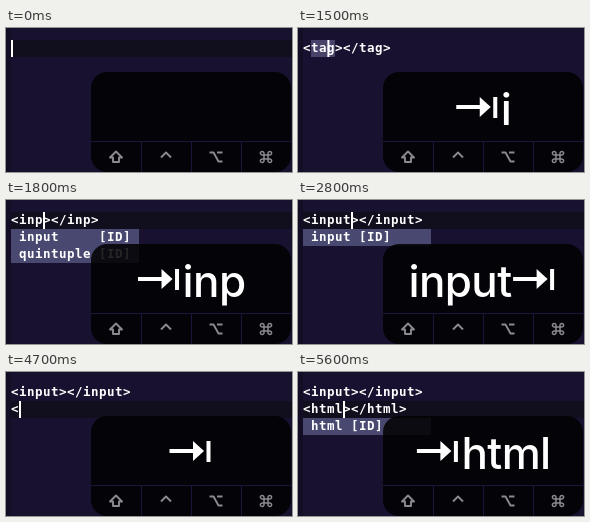
An HTML page with a canvas that plays this animation: 286 by 144 pixels, repeating every 6.4 s.

```html
<!DOCTYPE html>
<html lang="en">
<head>
<meta charset="utf-8">
<title>Typing tags</title>
<style>
  html, body { margin: 0; width: 100%; height: 100%; overflow: hidden; background: #18112f; }
  canvas { display: block; width: 286px; height: 144px; }
</style>
</head>
<body>
<canvas id="stage"></canvas>
<script>
const W = 286, H = 144, LOOP = 6400;
const COL = 8, ROW = 17, LEFT = 5, TOP = 12;
const CODE_FONT = 'bold 12.5px "DejaVu Sans Mono", monospace';
const KEY_FONT = '500 44px Inter, sans-serif';
const TAB = '\u21e5', RETURN = '\u21a9';
const ARROW_Y = 79;
const COLORS = {
  page: '#18112f', gutter: '#130e25', line: '#110e1e', select: '#49436a',
  menu: '#484870', panel: 'rgba(0,0,0,.85)', rule: '#18163a', icon: '#8b8a91'
};

const WORDS = ['input', 'quintuple', 'html', 'width', 'height', 'title'];
const fuzzy = query => WORDS.filter(word => {
  let at = -1;
  return [...query].every(ch => (at = word.indexOf(ch, at + 1)) >= 0);
});
const pair = name => `<${name}></${name}>`;
const typed = (name, row) => ({
  [row ? 'second' : 'first']: pair(name), col: 1 + name.length,
  keys: TAB + name, selected: false
});

// Each step changes only the listed parts of the state.
const STEPS = [
  [0, { first: '', second: '', row: 0, col: 0, caret: true, shift: false,
        selected: false, keys: '', menu: '' }],
  [100, { shift: true }],
  [400, { first: '<', col: 1, keys: '<' }],
  [600, { shift: false, keys: '' }],
  [800, { keys: TAB }],
  [900, { first: pair('tag'), selected: true }],
  [1000, { col: 2.9 }],
  [1200, { col: 4 }],
  [1400, { keys: TAB + 'i' }],
  [1500, { col: 3.05 }],
  [1600, typed('i', 0)],
  [1700, { ...typed('in', 0), menu: 'i' }],
  [1800, { ...typed('inp', 0), menu: 'inp' }],
  [1900, typed('inpu', 0)],
  [2000, { menu: 'inpu' }],
  [2100, typed('input', 0)],
  [2800, { keys: 'input' + TAB }],
  [2900, { col: 15, menu: '' }],
  [3400, { row: 1, col: 0, keys: 'nput' + TAB + RETURN }],
  [4100, { caret: false }],
  [4300, { caret: true, shift: true, keys: '' }],
  [4400, { second: '<', col: 1, keys: '<' }],
  [4600, { shift: false, keys: '' }],
  [4700, { keys: TAB }],
  [4900, { second: pair('tag'), selected: true, col: 2.9 }],
  [5000, { col: 4 }],
  [5100, { keys: TAB + 'h', col: 3.05 }],
  [5200, typed('h', 1)],
  [5300, { ...typed('ht', 1), menu: 'h' }],
  [5400, typed('htm', 1)],
  [5500, typed('html', 1)],
  [5600, { menu: 'html' }]
];

const stateAt = time =>
  Object.assign({}, ...STEPS.filter(([start]) => start <= time).map(step => step[1]));

const canvas = document.getElementById('stage');
const ctx = canvas.getContext('2d');
const ratio = window.devicePixelRatio || 1;
canvas.width = W * ratio;
canvas.height = H * ratio;

function box(color, x, y, w, h) {
  ctx.fillStyle = color;
  ctx.fillRect(x, y, w, h);
}

function setFont(font, spacing) {
  ctx.font = font;
  ctx.letterSpacing = spacing;
}

function code(text, col, row) {
  setFont(CODE_FONT, '0.475px');
  ctx.fillStyle = '#fff';
  ctx.fillText(text, LEFT + col * COL, TOP + row * ROW + 12);
}

function stroke(path, x, y, color, width) {
  ctx.save();
  ctx.translate(x, y);
  ctx.strokeStyle = color;
  ctx.lineWidth = width;
  ctx.lineJoin = 'round';
  ctx.stroke(new Path2D(path));
  ctx.restore();
}

function drawEditor(s) {
  box(COLORS.page, 0, 0, W, H);
  box(COLORS.gutter, 0, 0, LEFT, H);
  const y = TOP + s.row * ROW;
  if (s.selected) box(COLORS.select, LEFT + COL, y, 3 * COL, ROW);
  else box(COLORS.line, LEFT, y, W - LEFT, ROW);
  code(s.first, 0, 0);
  code(s.second, 0, 1);
  if (s.caret) box('#fff', LEFT + s.col * COL, y, 2, ROW);
}

function drawMenu(s) {
  const words = s.menu ? fuzzy(s.menu) : [];
  const length = Math.max(...words.map(word => word.length));
  words.forEach((word, i) => {
    const row = s.row + 1 + i;
    box(COLORS.menu, LEFT, TOP + row * ROW, 16 * COL, ROW);
    code(word.padEnd(length) + ' [ID]', 1, row);
  });
}

const ICONS = [
  [110, 'M0-5.5L6 .5H3V5H-3V.5H-6Z'],
  [160, 'M-5 .5L0-4.5L5 .5'],
  [210, 'M-6.5-4.5H-2.5L2.5 4.5H6.5M1-4.5H6.5'],
  [260, 'M-2-2H2V2H-2ZM-2-2H-3.7A1.8 1.8 0 1 1-2-3.8ZM2-2V-3.8A1.8 1.8 0 1 1 3.7-2Z' +
        'M2 2H3.7A1.8 1.8 0 1 1 2 3.8ZM-2 2V3.8A1.8 1.8 0 1 1-3.7 2Z']
];

function drawPanel(s) {
  ctx.fillStyle = COLORS.panel;
  ctx.beginPath();
  ctx.roundRect(85, 44, 200, 100, 16);
  ctx.fill();
  box(COLORS.rule, 85, 113, 200, 1);
  for (const x of [135, 185, 235]) box(COLORS.rule, x, 114, 1, 30);
  ICONS.forEach(([x, path], i) =>
    stroke(path, x, 129, i === 0 && s.shift ? '#fff' : COLORS.icon, i === 3 ? 1.5 : 1.9));
}

function arrowHead(tip, base) {
  ctx.beginPath();
  ctx.moveTo(tip, ARROW_Y);
  ctx.lineTo(base, ARROW_Y - 10);
  ctx.lineTo(base, ARROW_Y + 10);
  ctx.fill();
}

function drawTab(x) {
  box('#fff', x + 1.5, ARROW_Y - 2, 26, 4);
  arrowHead(x + 36, x + 25);
  box('#fff', x + 38.5, ARROW_Y - 10, 4, 21);
}

function drawReturn(x) {
  ctx.fillStyle = '#fff';
  arrowHead(x + 4, x + 15);
  stroke(`M13 ${ARROW_Y}H33.5a8.75 8.75 0 0 0 0-17.5H29`, x, 0, '#fff', 4);
}

function drawKeys(keys) {
  const parts = keys.match(/[\u21e5\u21a9]|[^\u21e5\u21a9]+/g) || [];
  setFont(KEY_FONT, '-0.6px');
  const widths = parts.map(part =>
    part === TAB ? 46 : part === RETURN ? 50 : ctx.measureText(part).width);
  let x = 185 - widths.reduce((sum, w) => sum + w, 0) / 2;
  parts.forEach((part, i) => {
    ctx.fillStyle = '#fff';
    if (part === TAB) drawTab(x);
    else if (part === RETURN) drawReturn(x);
    else ctx.fillText(part, x, 97);
    x += widths[i];
  });
}

function frame(now) {
  const state = stateAt(now % LOOP);
  ctx.setTransform(ratio, 0, 0, ratio, 0, 0);
  drawEditor(state);
  drawMenu(state);
  drawPanel(state);
  drawKeys(state.keys);
  requestAnimationFrame(frame);
}
requestAnimationFrame(frame);
</script>
</body>
</html>
```
